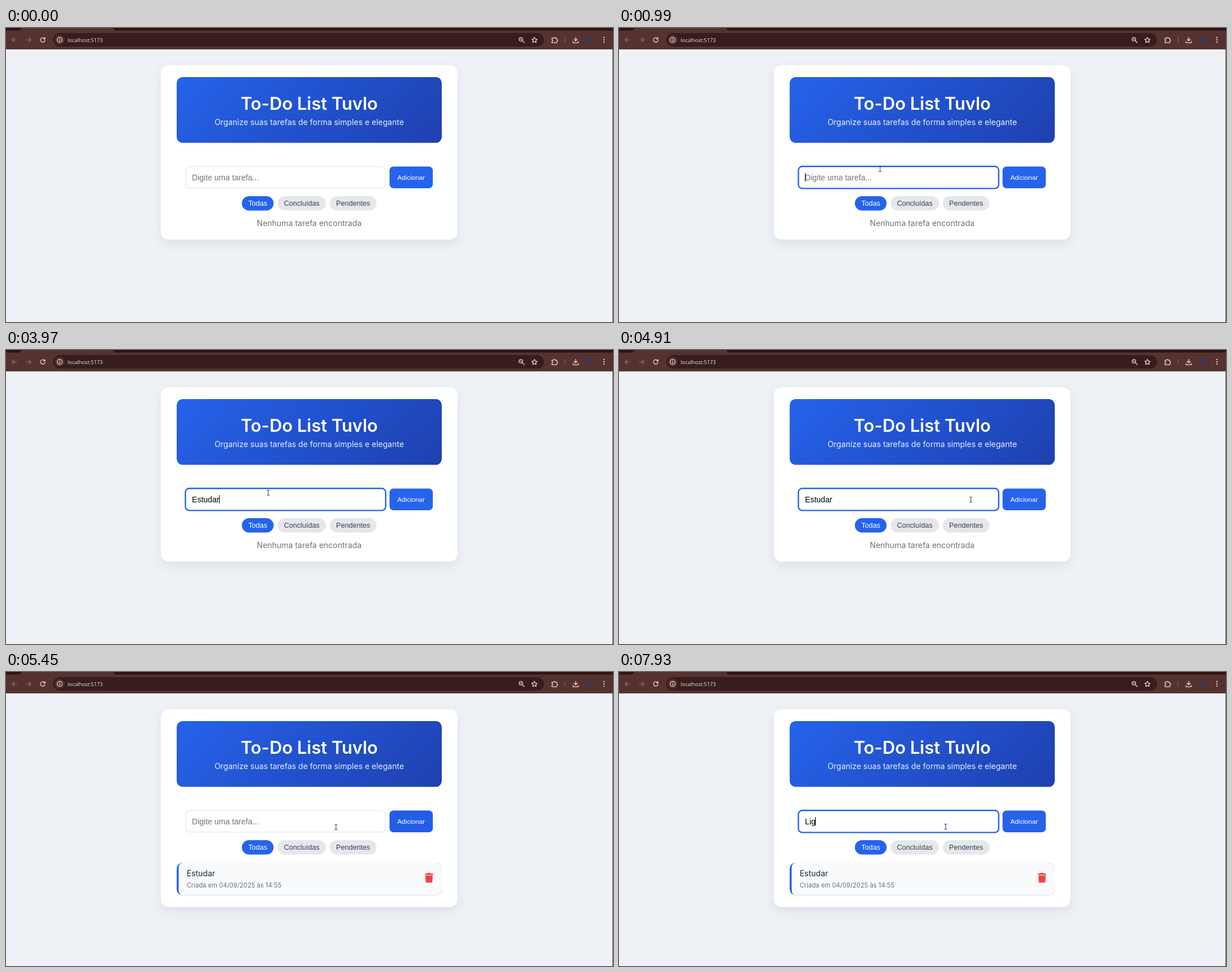
An HTML page for the animation above (8000 ms loop, 1074 by 521 pixels).

```html
<!DOCTYPE html>
<html lang="pt">
<head>
<meta charset="utf-8">
<title>To-Do List</title>
<style>
html, body { margin: 0; width: 100%; height: 100%; overflow: hidden; background: #eef2f7; }
svg { display: block; }
text { font-family: Inter, sans-serif; font-size: 14px; font-optical-sizing: none; white-space: pre; }
.mid { text-anchor: middle; }
.ui { font-family: "Liberation Sans", Arial, sans-serif; }
.pill { font-size: 12.6px; fill: #374151; }
.icon { fill: none; stroke: #ecdcd9; stroke-width: 1.25; stroke-linecap: round; stroke-linejoin: round; }
.dim { stroke: #8c6a66; }
#card { fill: #fff; filter: drop-shadow(0 7px 9px rgba(30, 41, 59, .09)); }
#field { fill: #fff; stroke: #dfe2e7; stroke-width: 1.1; }
#field.focus { stroke: #2563eb; stroke-width: 2.4; }
</style>
</head>
<body>
<svg width="1074" height="521" viewBox="0 0 1074 521">
  <defs>
    <linearGradient id="blue" gradientUnits="userSpaceOnUse" x1="390" y1="-1" x2="683" y2="292">
      <stop stop-color="#2563eb"/><stop offset="1" stop-color="#1e40af"/>
    </linearGradient>
    <clipPath id="itemClip"><rect x="302" y="338" width="469" height="57.5" rx="10.5"/></clipPath>
  </defs>
  <rect width="1074" height="521" fill="#eef2f7"/>

  <!-- Browser bar -->
  <rect width="1074" height="38" fill="#553230"/>
  <rect x="-10" y="-10" width="37" height="14.5" rx="5" fill="#2d1514"/>
  <rect x="190" y="-10" width="900" height="14.5" rx="5" fill="#2d1514"/>
  <rect y="37" width="1074" height="1" fill="#674845"/>
  <rect x="83.5" y="9" width="868.5" height="24" rx="12" fill="#371d1c"/>
  <circle cx="95" cy="21" r="8.5" fill="#553230"/>
  <g class="icon">
    <path class="dim" d="M19 21H11M14.5 17.2L10.7 21l3.8 3.8M36 21h8M40.500 17.200L44.300 21l-3.800 3.800"/>
    <path d="M68.300 18.600A4 4 0 1 0 69 22M69 16.800v2.700h-2.700"/>
    <circle cx="95" cy="21" r="4.4"/><path d="M95 20.700v2.300M95 18.800v.1"/>
    <circle cx="911" cy="20" r="3.200"/><path d="M913.500 22.500L917 26M909.800 20h2.400"/>
    <path d="M935 16.500l1.450 3.100 3.350.4-2.450 2.300.65 3.350-3-1.700-3 1.700.65-3.350-2.450-2.300 3.350-.4z"/>
    <path d="M966 18h2.800a1.500 1.500 0 0 1 3 0h2.700v2.700a1.500 1.500 0 0 1 0 3v2.300h-8.500v-2.500a1.500 1.500 0 0 0 0-3z"/>
    <path d="M989 16.500v9" stroke="#7d5b57"/>
    <path d="M1008 16.300v6.200M1005.200 20l2.800 2.700 2.800-2.700M1003.300 23.500v2.600h9.400v-2.600"/>
  </g>
  <circle cx="1033" cy="21" r="7" fill="#43364f"/>
  <g fill="#ecdcd9"><circle cx="1058" cy="17" r="1.150"/><circle cx="1058" cy="21" r="1.150"/><circle cx="1058" cy="25" r="1.150"/></g>
  <text x="109" y="24.600" fill="#f3e5e3" style="font-family:'Open Sans',sans-serif;font-size:9.250px">localhost:5173</text>

  <!-- Page -->
  <rect id="card" x="274" y="66" width="525" height="309" rx="14"/>
  <rect x="302" y="87" width="469" height="116.500" rx="10.500" fill="url(#blue)"/>
  <text class="mid" x="536.500" y="145" fill="#fff" style="font-size:30.800px;font-weight:600">To-Do List Tuvlo</text>
  <text class="mid" x="536.500" y="172" fill="#fff" fill-opacity=".9">Organize suas tarefas de forma simples e elegante</text>

  <rect id="field" rx="7"/>
  <text id="hint" class="ui" x="329.100" y="269.600" fill="#757575">Digite uma tarefa...</text>
  <text id="typed" class="ui" x="329.100" y="269.600"></text>
  <rect id="caret" y="257" width="1" height="15"/>

  <rect x="678.600" y="245.500" width="76.600" height="38.500" rx="7" fill="#2563eb"/>
  <rect id="hover" x="678.600" y="245.500" width="76.600" height="38.500" rx="7" fill="#1d4ed8"/>
  <text class="ui mid" x="716.900" y="268.500" fill="#fff" style="font-size:11.667px">Adicionar</text>

  <rect x="417.300" y="298" width="56.200" height="25.500" rx="12.750" fill="#2563eb"/>
  <rect x="480.500" y="298" width="85.400" height="25.500" rx="12.750" fill="#e5e7eb"/>
  <rect x="572.900" y="298" width="82.700" height="25.500" rx="12.750" fill="#e5e7eb"/>
  <text class="ui mid pill" x="445.500" y="315" style="fill:#fff">Todas</text>
  <text class="ui mid pill" x="523.200" y="315">Concluídas</text>
  <text class="ui mid pill" x="614.200" y="315">Pendentes</text>

  <text id="empty" class="mid" x="536.500" y="351" fill="#6b7280">Nenhuma tarefa encontrada</text>
  <g id="item">
    <g clip-path="url(#itemClip)">
      <rect x="302" y="338" width="469" height="57.500" fill="#2563eb"/>
      <path d="M771 338H312.500Q305.500 338 305.500 348.500V385Q305.500 395.500 312.500 395.500H771z" fill="#f9fafb"/>
    </g>
    <text x="319.700" y="362.300" fill="#1f2937">Estudar</text>
    <text x="319.700" y="382" fill="#6b7280" style="font-size:11.200px">Criada em 04/09/2025 às 14:55</text>
    <path fill="#ef4444" d="M741 357.200h4.300l.8-1.200h4.800l.8 1.200h4.300v2.200h-15zM742 360.500h13l-.7 11.200q-.1 1.600-1.700 1.600h-8.200q-1.600 0-1.700-1.600z"/>
  </g>

  <!-- Pointer -->
  <g id="pointer">
    <circle id="press" r="8.700" fill="#ffe100" fill-opacity=".5"/>
    <path id="arrow" d="M0 0V13.500L3.200 10.600 5.300 15.400 7.500 14.400 5.400 9.800H9.700z" fill="#fff" stroke="#222" stroke-width=".8"/>
    <path id="beam" d="M-2.500-4.500H-.7L0-4 .7-4.500H2.500M0-4V4M-2.500 4.500H-.7L0 4 .7 4.500H2.500" fill="none" stroke="#333" stroke-width="1"/>
    <path id="hand" d="M-1 .8Q0-.8 1 .8V4.500l3.300.7q1.500.4 1.300 2L4.800 11.500H-.8L-3.500 7.500q-.2-1.200 1-1L-1 7.500z" fill="#fff" stroke="#444" stroke-width=".5"/>
  </g>
  <rect x="1073" y="38" width="1" height="483" fill="#55484a"/>
</svg>
<script>
const LOOP = 8000, BLINK = 525, STEP = 66.6;
const ADDED = 5240, PRESSED = 5100;
const $ = id => document.getElementById(id);

// [time, text, focused]; every entry restarts the caret
const edits = [[0, "", false], [990, "", true]];
const type = (word, times) => times.forEach((at, i) => edits.push([at, word.slice(0, i + 1), true]));
type("Estudar", [2040, 2370, 2640, 3180, 3640, 3780, 3970]);
edits.push([4045, "Estudar", true], [PRESSED, "Estudar", false], [ADDED, "", false], [5795, "", true]);
type("Lig", [7330, 7590, 7930]);

// [time, x, y]
const path = [
  [130, 992, 498], [330, 900, 420], [530, 700, 300], [730, 505, 228], [920, 462, 250],
  [1320, 462, 250], [1510, 464, 253], [4510, 464, 253], [4800, 560, 268], [5030, 700, 262],
  [5165, 712, 259], [5240, 712, 259], [5310, 700, 264], [5445, 584, 275], [5650, 574, 278], [5900, 578, 274]
];
const moveStarts = [130, 990, 1380, 4570, 5380];

const clamp = v => Math.min(1, Math.max(0, v));
const show = (id, on) => $(id).setAttribute("visibility", on ? "visible" : "hidden");
const set = (id, attrs) => { for (const k in attrs) $(id).setAttribute(k, attrs[k]); };

function pointerAt(t) {
  const start = moveStarts.filter(s => s <= t).pop() ?? 130;
  const q = start + Math.floor(Math.max(0, t - start) / STEP) * STEP;
  const i = path.findIndex(p => p[0] > q);
  if (i < 0) return path[path.length - 1].slice(1);
  const [t0, x0, y0] = path[i - 1], [t1, x1, y1] = path[i];
  const k = (q - t0) / (t1 - t0);
  return [x0 + (x1 - x0) * k, y0 + (y1 - y0) * k];
}

function draw(t) {
  const [since, text, focused] = edits.filter(e => e[0] <= t).pop();
  const grow = focused ? .6 : 0;
  $("field").classList.toggle("focus", focused);
  set("field", { x: 318 - grow, y: 245.8 - grow, width: 353.2 + 2 * grow, height: 38 + 2 * grow });
  if ($("typed").textContent !== text) $("typed").textContent = text;
  show("hint", !text);
  set("caret", { x: Math.round(329 + (text ? $("typed").getComputedTextLength() - .5 : 0)) });
  show("caret", focused && Math.floor((t - since) / BLINK) % 2 === 0);

  const added = t >= ADDED;
  show("item", added);
  show("empty", !added);
  set("card", { height: added ? 350.5 : 309 });
  set("hover", { opacity: clamp((t - 4980) / 180) - clamp((t - 5320) / 180) });

  const [x, y] = pointerAt(t), visible = t >= 130;
  const inRow = y > 245 && y < 284;
  const shape = inRow && x > 318 && x < 672 ? "beam" : inRow && x > 678 && x < 755 ? "hand" : "arrow";
  set("pointer", { transform: `translate(${x.toFixed(1)} ${y.toFixed(1)})` });
  for (const id of ["arrow", "beam", "hand"]) show(id, visible && id === shape);
  show("press", t >= PRESSED && t < ADDED);
}

const begin = performance.now();
function tick() {
  draw((performance.now() - begin) % LOOP);
  requestAnimationFrame(tick);
}
tick();
</script>
</body>
</html>
```
